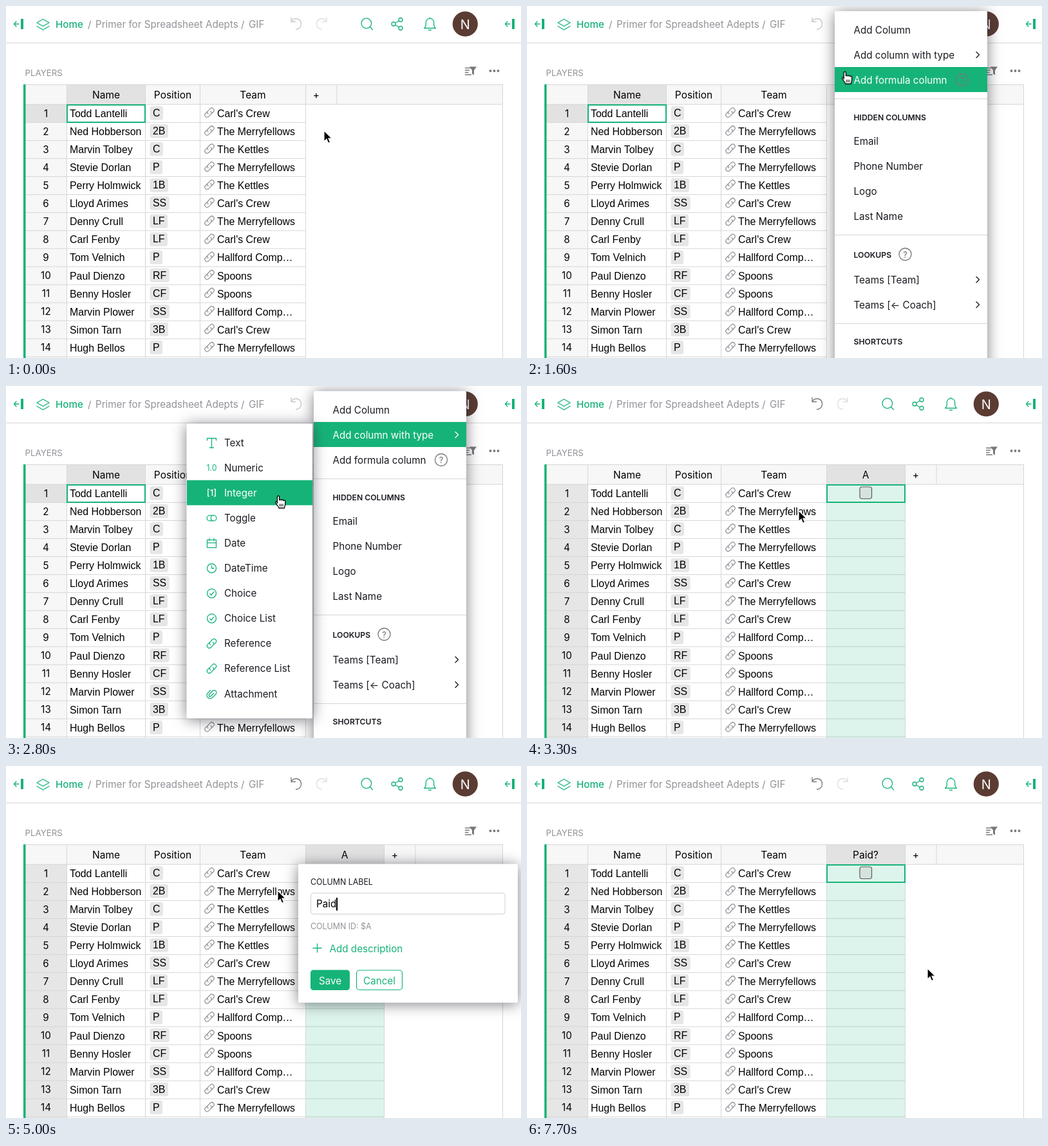
These frames come from a looping animation (800x548 px, 8000 ms). An HTML page:

```html
<!DOCTYPE html>
<html lang="en">
<head>
<meta charset="utf-8">
<title>Adding a column</title>
<style>
html, body { margin: 0; width: 100%; height: 100%; overflow: hidden; background: #fff; }
svg { display: block; width: 800px; height: 548px; }
text { font: 15.2px Inter, sans-serif; dominant-baseline: central; fill: currentColor; white-space: pre; }
.cell { font: 15.9px "Liberation Sans", Arial, sans-serif; fill: #000; }
.head { font-size: 15.5px; fill: #000; }
.number { fill: #000; }
.mid, .head, .number { text-anchor: middle; }
.small { font-size: 12.4px; }
.caption { font-size: 13.3px; }
.digit { font-size: 13.5px; font-weight: 500; }
.initial { font-size: 20px; }
.bold { font-weight: 600; font-size: 12.2px; }
.medium { font-weight: 500; }
.gray { color: #929299; }
.green { color: #16b378; }
.white { color: #fff; }
.icon { fill: none; stroke: currentColor; stroke-width: 1.3; stroke-linecap: round; stroke-linejoin: round; }
.thin { stroke-width: 1.1; }
.line { stroke: #d6d6d6; }
.panel { fill: #fff; filter: drop-shadow(0 2px 11px rgba(38, 38, 51, .6)); }
.typed { display: flex; align-items: center; height: 24px; font: 15.2px/24px Inter, sans-serif; color: #000; }
.typed i { width: 1.4px; height: 20px; background: #000; }
#cursor { animation: move 8s infinite; }
@keyframes move {
  0% { transform: translate(494px, 194px); animation-timing-function: step-end; }
  3.75% { transform: translate(494px, 194px); animation-timing-function: steps(5, start); }
  10% { transform: translate(484px, 139px); animation-timing-function: step-end; }
  17.5% { transform: translate(484px, 139px); animation-timing-function: steps(4, start); }
  22.5% { transform: translate(497px, 90px); animation-timing-function: steps(5, start); }
  28.75% { transform: translate(485px, 82px); animation-timing-function: steps(2, start); }
  31.25% { transform: translate(440px, 98px); animation-timing-function: steps(4, start); }
  36.25% { transform: translate(423px, 171px); animation-timing-function: steps(3, start); }
  40% { transform: translate(422px, 194px); animation-timing-function: step-end; }
  70% { transform: translate(422px, 194px); animation-timing-function: steps(6, start); }
  77.5% { transform: translate(512px, 333px); animation-timing-function: step-end; }
  81.25% { transform: translate(512px, 333px); animation-timing-function: steps(3, start); }
  85%, 100% { transform: translate(622px, 315px); }
}
</style>
</head>
<body>
<svg id="stage" viewBox="0 0 800 548" color="#1a1a22"></svg>
<script>
const LOOP = 8000, GREEN = '#16b378', LIGHT = '#f7f7f7', DARK = '#e2e2e2';
const TOP = 153, PITCH = 28.06;
const MENU_OPEN = 1000, ON_TYPE = 1700, SUB_OPEN = 1800, PICK = 3200,
      ADDED = 3300, ASK = 3400, TYPE = 4600, HOVER = 6100, SAVED = 6400;

const teams = ["Carl's Crew", 'The Merryfellows', 'The Kettles', 'Hallford Comp…', 'Spoons'];
const players = [
  ['Todd Lantelli', 'C', 0], ['Ned Hobberson', '2B', 1], ['Marvin Tolbey', 'C', 2],
  ['Stevie Dorlan', 'P', 1], ['Perry Holmwick', '1B', 2], ['Lloyd Arimes', 'SS', 0],
  ['Denny Crull', 'LF', 1], ['Carl Fenby', 'LF', 0], ['Tom Velnich', 'P', 3],
  ['Paul Dienzo', 'RF', 4], ['Benny Hosler', 'CF', 4], ['Marvin Plower', 'SS', 3],
  ['Simon Tarn', '3B', 0], ['Hugh Bellos', 'P', 1]
];

const text = (x, y, s, cls = '') => `<text x="${x}" y="${y}" class="${cls}">${s}</text>`;
const rect = (x, y, w, h, fill, more = '') =>
  `<rect x="${x}" y="${y}" width="${w}" height="${h}" fill="${fill}" ${more}/>`;
const path = (d, cls = '', more = '') => `<path d="${d}" class="icon ${cls}" ${more}/>`;
const at = (x, y, s) => `<g transform="translate(${x} ${y})">${s}</g>`;
const during = (from, to, s) => `<g data-on="${from} ${to}">${s}</g>`;
const hline = (y, x1, x2) => `<path class="line" d="M${x1} ${y}H${x2}"/>`;
const vline = (x, y1, y2) => `<path class="line" d="M${x} ${y1}V${y2}"/>`;
const rowY = i => TOP + PITCH * i;

const half = 'M2.5 0a3 3 0 0 1-3 3h-4a3 3 0 0 1 0-6h3';
const link = `<g transform="rotate(-45) scale(1.15)">${path(half, 'thin')}${path(half, 'thin', 'transform="rotate(180)"')}</g>`;
const ring = path('M-7 0a7 7 0 1 0 14 0a7 7 0 1 0-14 0');
const check = ring + path('M-3 .3l2.3 2.4 4-5');
const help = (x, y) => at(x, y, `<g color="#777">${path('M-9.5 0a9.5 9.5 0 1 0 19 0a9.5 9.5 0 1 0-19 0')}
  ${text(0, .5, '?', 'mid small medium')}</g>`);
const chevron = y => path(`M698 ${y - 4.5}l4.5 4.5-4.5 4.5`, '', 'stroke-width="1.8"');

function toolbar() {
  const collapse = x => at(x, 28, rect(11, -8, 4, 16, GREEN) + path('M8 0H.5M4-4L.5 0 4 4', 'green'));
  const undo = 'M-8-10v6.5h6.5M-8-4c5-7 15.5-5 15.5 4 0 5-3.5 8-8 8.5';
  const arc = color => at(451, 28, `<g color="${color}">${path(undo)}</g>`);
  return hline(57.5, 0, 800) + collapse(12) + collapse(775) +
    path('M57.5 20.5l9.5 5.5-9.5 5.5-9.5-5.5zM48 31.5l9.5 5.5 9.5-5.5', 'green') +
    text(77, 28, 'Home', 'green medium') +
    `<g class="gray">${text(127, 28, '/')}${text(139, 28, 'Primer for Spreadsheet Adepts')}
      ${text(365, 28, '/')}${text(377, 28, 'GIF')}</g>` +
    during(0, ADDED, arc('#c8c8cb')) + during(ADDED, LOOP, arc('#77777c')) +
    at(490, 28, `<g color="#dedee0" transform="scale(-1 1)">${path(undo)}</g>`) +
    `<g class="green">${path('M552 27a7.8 7.8 0 1 0 15.6 0a7.8 7.8 0 1 0-15.6 0M565.5 32.5l4 4.5')}
      ${path('M599 28a3 3 0 1 0 6 0a3 3 0 1 0-6 0M610 21.5a3 3 0 1 0 6 0a3 3 0 1 0-6 0M610 34.5a3 3 0 1 0 6 0a3 3 0 1 0-6 0M604.6 26.5l5.8-3.5M604.6 29.5l5.8 3.5')}
      ${path('M649.5 34.5h18c-2-1.5-2.8-3-2.8-5.5v-3.5a6.2 6.2 0 0 0-12.4 0V29c0 2.5-.8 4-2.8 5.5zM656.5 37.5h4M658.5 19v-1')}</g>` +
    `<circle cx="713.3" cy="28" r="19.6" fill="#5b3c33"/>` +
    text(713.3, 28.5, 'N', 'mid white initial');
}

function table() {
  const headers = [[155.5, 'Name'], [259, 'Position'], [383.5, 'Team']];
  const focus = x => rect(x, 154, 121, 27, 'none', `stroke="${GREEN}" stroke-width="2"`);
  let s = text(29.5, 103.5, 'PLAYERS', 'gray caption') +
    `<g color="#77777c">${path('M713.5 96.5h8M713.5 100h6M713.5 103.5h4.5M713.5 107h9')}
      <path d="M720 94.5h11l-4 5.5v7.5l-3-2V100z" fill="currentColor"/>
      ${[752.5, 758.5, 764.5].map(x => `<circle cx="${x}" cy="101" r="1.9" fill="currentColor"/>`).join('')}</g>`;
  s += rect(30, 123, 741, 30, LIGHT) + rect(30, TOP, 64, 400, LIGHT);

  // Shading that follows the selection
  s += during(0, ADDED, rect(95, 123, 121, 30, DARK) + rect(30, TOP, 64, 28, DARK));
  s += during(ADDED, LOOP, rect(30, TOP, 64, 400, '#e6e6e6') + rect(466, 123, 121, 30, DARK));

  s += hline(122.5, 30, 772) + hline(153.2, 30, 772) + vline(771.5, 123, 548);
  players.forEach(([name, pos, team], i) => {
    const y = rowY(i) + 14;
    s += hline(rowY(i + 1) + .3, 30, 465) + text(62, y, i + 1, 'number') + text(99, y + .5, name, 'cell') +
      `<g class="tag">${rect(223.5, y - 11, 20, 21.5, '#e6e6e6', 'rx="3.5"')}${text(228, y - .5, pos, 'cell')}</g>` +
      at(316, y - 1, `<g class="gray">${link}</g>`) + text(328, y + .5, teams[team], 'cell');
  });
  s += [94.5, 216.5, 301.5, 465.5].map(x => vline(x, 123, 548)).join('');
  headers.forEach(([x, h]) => s += text(x, 138.5, h, 'head'));

  s += during(0, ADDED, text(482, 138.5, '+', 'head') + vline(514, 123, 153) + focus(95));
  const lines = players.map((_, i) => hline(rowY(i + 1) + .3, 466, 587)).join('');
  s += during(ADDED, LOOP,
    lines + vline(587.5, 123, 548) + vline(636, 123, 153) + text(604, 138.5, '+', 'head') +
    rect(466, 154, 121, 400, GREEN, 'opacity=".15"') + focus(466) +
    rect(517, 157, 18.5, 18.5, '#d5e3dd', 'rx="3.5" stroke="#5c5c5c" stroke-width="1.2"') +
    during(ADDED, SAVED, text(526, 138.5, 'A', 'head')) +
    during(SAVED, LOOP, text(526, 138.5, 'Paid?', 'head')));
  return s + rect(27, 122, 3.5, 426, GREEN);
}

function menu() {
  const rows = [
    ['Add Column', 37, ''],
    ['Add column with type', 76, chevron(76)],
    ['Add formula column', 115, help(676, 115)]
  ];
  const draw = ([s, y, extra]) => text(507.5, y + .5, s) + extra;
  const lit = (i, from, to) => during(from, to,
    rect(478, rows[i][1] - 20, 237, 39, GREEN) + `<g class="white">${draw(rows[i])}</g>`);
  const plain = (list, y) => list.map((s, i) => text(507.5, y + i * 39, s)).join('');
  return during(MENU_OPEN, PICK,
    rect(478, 8, 237, 600, '#fff', 'class="panel" rx="2"') + rows.map(draw).join('') +
    [144.5, 356.5, 494.5].map(y => hline(y, 478, 715)).join('') +
    text(507.5, 173, 'HIDDEN COLUMNS', 'bold') + plain(['Email', 'Phone Number', 'Logo', 'Last Name'], 210.5) +
    text(507.5, 387, 'LOOKUPS', 'bold') + help(587.5, 386.5) +
    plain(['Teams [Team]', 'Teams [← Coach]'], 426) + chevron(426) + chevron(465) +
    text(507.5, 522.5, 'SHORTCUTS', 'bold') +
    lit(0, MENU_OPEN, 1400) + lit(2, 1400, ON_TYPE) + lit(1, ON_TYPE, PICK));
}

function submenu() {
  const items = [
    ['Text', path('M-7-4v-3H7v3M0-7V7.5M-3 7.5h6')],
    ['Numeric', text(0, 0, '1.0', 'mid small')],
    ['Integer', text(0, -.5, '[1]', 'mid digit')],
    ['Toggle', path('M-3-4.3h6a4.3 4.3 0 0 1 0 8.6h-6a4.3 4.3 0 0 1 0-8.6zM-1.3 0a4.3 4.3 0 1 0 8.6 0a4.3 4.3 0 1 0-8.6 0')],
    ['Date', path('M-7-5H7V7H-7zM-7-.5H7M-3.5-7.5v3.5M3.5-7.5v3.5')],
    ['DateTime', ring + path('M0-4V0h3.5')],
    ['Choice', check],
    ['Choice List', check],
    ['Reference', link],
    ['Reference List', link],
    ['Attachment', `<g transform="rotate(45)">${path('M1.8-2.5v6a1.9 1.9 0 0 1-3.8 0v-7.5a3.5 3.5 0 0 1 7 0v7.5a5 5 0 0 1-10 0v-5.5')}</g>`]
  ];
  const y = i => 88.5 + i * 39.05;
  const draw = (i, cls) => at(319.5, y(i), `<g class="${cls}">${items[i][1]}</g>`) + text(339, y(i), items[i][0]);
  const lit = (i, from, to) => during(from, to,
    rect(281, y(i) - 20, 195, 39, GREEN) + `<g class="white">${draw(i, '')}</g>`);
  return during(SUB_OPEN, PICK,
    rect(280.5, 58.5, 195.5, 459, '#fff', 'class="panel" rx="2"') +
    items.map((_, i) => draw(i, 'green')).join('') +
    lit(0, 2300, 2500) + lit(1, 2500, 2700) + lit(2, 2700, 3000) + lit(3, 3000, PICK));
}

function popup() {
  const button = (x, w, s, fill) => rect(x, 317.5, w, 31.5, fill, 'rx="4.5"') + text(x + w / 2, 334, s, 'mid white');
  const letters = [['P', 4600], ['a', 4700], ['i', 4900], ['d', 5000], ['?', 5300]]
    .map(([c, t]) => `<span data-on="${t} ${SAVED}" data-size>${c}</span>`).join('');
  return during(ASK, SAVED,
    rect(454, 152.5, 341, 216, '#fff', 'class="panel" rx="2"') +
    text(473, 180.5, 'COLUMN LABEL', 'small') +
    rect(473.5, 198, 301.5, 32.5, '#fff', 'rx="3.5" stroke="#d0d0d4"') +
    text(473, 249.5, 'COLUMN ID: $A', 'small gray') +
    path('M477 283.5h13M483.5 277v13', 'green') + text(502.5, 284.5, 'Add description', 'green') +
    during(ASK, TYPE, rect(481.5, 205, 10.5, 20, '#b3d7ff') + text(482, 215, 'A') + button(473, 63.5, 'Close', GREEN)) +
    during(TYPE, SAVED,
      `<foreignObject x="482" y="203" width="200" height="24"><div class="typed">${letters}<i></i></div></foreignObject>` +
      button(473, 61, 'Save', GREEN) +
      rect(544.5, 318, 71, 30.5, '#fff', `rx="4.5" stroke="${GREEN}" stroke-width="1.2"`) +
      text(580, 334, 'Cancel', 'mid green') +
      during(HOVER, SAVED, button(473, 61, 'Save', '#009058'))));
}

function cursor() {
  const arrow = '<path d="M0 0v17l4-3.8 2.6 6.2 3-1.2-2.6-6h5.4z" stroke="#fff" stroke-width="1.2"/>';
  const hand = `<path d="M-1.6 12V1.6a1.6 1.6 0 0 1 3.2 0V7a1.6 1.6 0 0 1 3.1.2a1.6 1.6 0 0 1 3.1.8a1.5 1.5 0 0 1 3 .6v4c0 3-1.3 3.6-1.3 6.4H1c0-2-3.3-4.6-5-8c-.9-1.9 1-3 2.4-1.2z"
    fill="#fff" stroke="#000" stroke-width="1.3"/><path d="M2.5 12.5v4M4.8 12.5v4M7.1 12.5v4" stroke="#000"/>`;
  return `<g id="cursor">${during(0, 1400, arrow)}${during(1400, PICK, hand)}${during(PICK, HOVER, arrow)}
    ${during(HOVER, SAVED, hand)}${during(SAVED, LOOP, arrow)}</g>`;
}

// Each data-on span becomes one stepped keyframe rule
function schedule(nodes) {
  const rules = new Map();
  nodes.forEach(el => {
    const [from, to] = el.dataset.on.split(' ').map(Number);
    const sized = 'size' in el.dataset;
    const off = sized ? 'font-size:0' : 'opacity:0';
    const on = sized ? 'font-size:15.2px' : 'opacity:1';
    const name = `${sized ? 'type' : 'show'}-${from}-${to}`;
    const pct = t => t / LOOP * 100 + '%';
    const end = to < LOOP ? `${pct(to)},100%{${off}}` : `100%{${on}}`;
    rules.set(name, `@keyframes ${name}{${from ? `0%{${off}}` : ''}${pct(from)}{${on}}${end}}`);
    el.style.animation = `${name} ${LOOP}ms step-end infinite`;
  });
  const style = document.createElement('style');
  style.textContent = [...rules.values()].join('\n');
  document.head.append(style);
}

const stage = document.getElementById('stage');
stage.innerHTML = toolbar() + table() + menu() + submenu() + popup() + cursor();
stage.querySelectorAll('.tag').forEach(tag => {
  const [box, label] = tag.children;
  box.setAttribute('width', label.getComputedTextLength() + 9);
});
schedule(stage.querySelectorAll('[data-on]'));
</script>
</body>
</html>
```
